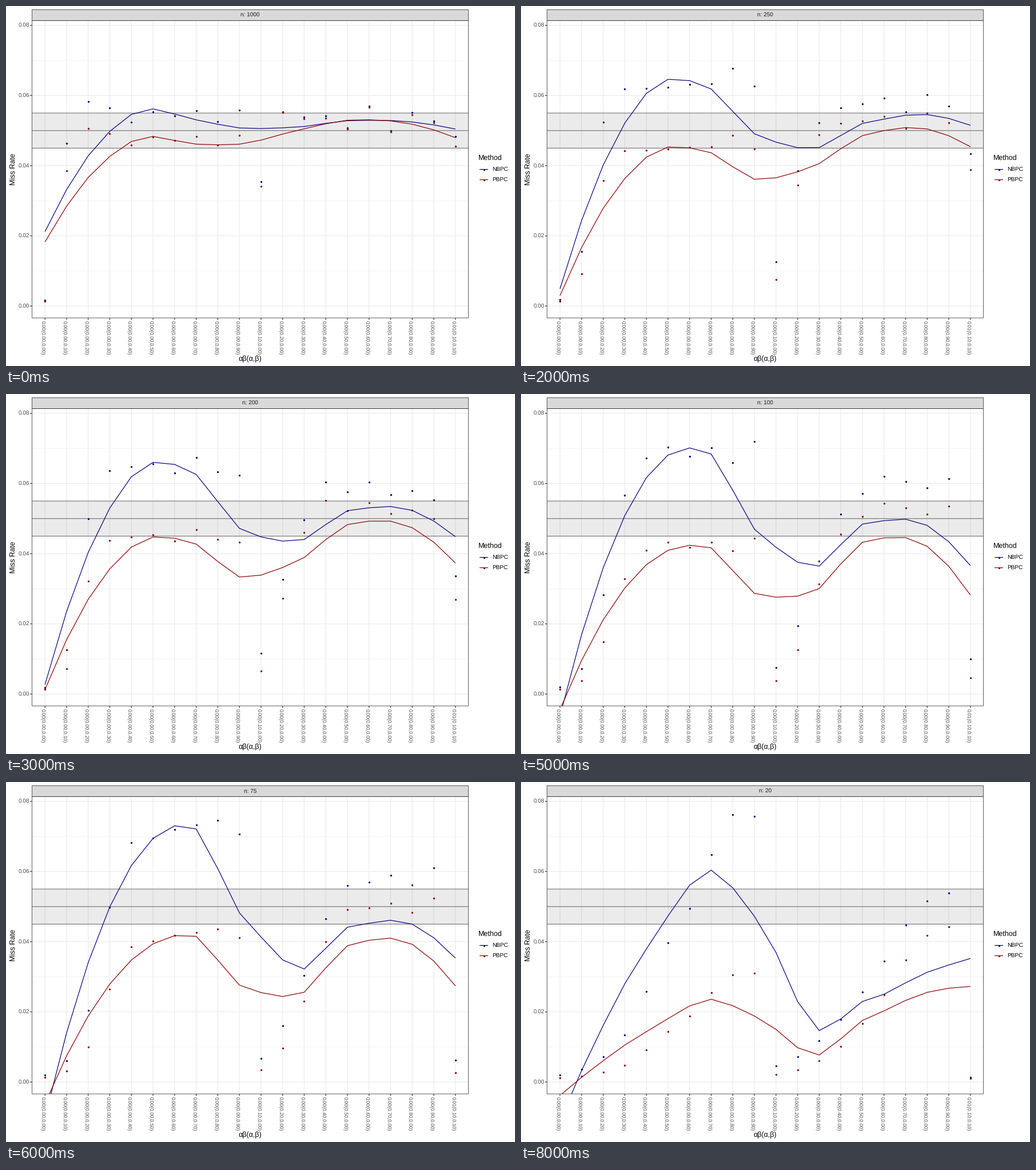
A matplotlib script that plays this animation: 890x629 px, repeating every 9 s.

```python
import numpy as np
import matplotlib.pyplot as plt
from matplotlib.animation import FuncAnimation
from matplotlib.patches import Rectangle

W, H, DPI = 890, 629, 64
PX = 72 / DPI  # points per pixel
LEFT, RIGHT, TOP, BOTTOM = 45.5, 808.5, 25.5, 545
COLORS = ("#000080", "#8b0000")
DARK, GREY, GRID = "#333333", "#4d4d4d", "#ebebeb"
SIZES = (1000, 500, 250, 200, 150, 100, 75, 50, 20)

plt.rcParams.update({"font.family": "Liberation Sans", "path.snap": False,
                     "text.hinting": "none"})

# Effects: beta rises with alpha at 0, then alpha with beta at 0, then both 0.1
LEVELS = np.arange(1, 21)
BETA = np.where(LEVELS <= 10, (LEVELS - 1) / 10, 0)
ALPHA = np.where(LEVELS > 10, (LEVELS - 10) / 10, 0)
ALPHA[-1] = BETA[-1] = 0.1

STEP = (RIGHT - LEFT) / 20.2
XS = LEFT + (LEVELS - 0.4) * STEP


def to_y(rate):
    return 524.2 - np.asarray(rate) * 6130


def rise(z, top, mid, width):
    return top / (1 + np.exp((mid - z) / width))


def miss_rates(n, rng):
    """Miss rates of both methods: each climbs to its plateau with effect * sqrt(n)."""
    za, zb = ALPHA * np.sqrt(n), BETA * np.sqrt(n)
    size = np.log(n / 20)
    beta_part = (rise(zb, 0.078 - 0.006 * size, 2.25, 0.55),
                 rise(zb, 0.050 - 0.082 / np.sqrt(n), 2.4, 0.55))
    alpha_part = (rise(za, 0.065 - 0.0032 * size, 2.65, 0.8),
                  rise(za, 0.052, 2.8, 0.65))
    both = (rise(za, 0.049, 1.25, 0.18), rise(za, 0.046, 1.35, 0.15))
    mean = np.where(LEVELS <= 10, beta_part, alpha_part)
    mean = np.where(LEVELS == 20, both, mean)
    noisy = mean * (1 + rng.normal(0, 0.032, 20)) + 0.0008
    return np.round(noisy * 5000) / 5000


# Loess, span 0.75, degree 2: exact at the k-d knots, cubic in between
KNOTS = np.array([0.905, 3, 5, 8, 10, 13, 15, 18, 20.095])


def local_fit(x0, y):
    d = np.abs(LEVELS - x0)
    w = np.clip(1 - (d / np.sort(d)[14]) ** 3, 0, None) ** 3
    _, slope, value = np.polyfit(LEVELS - x0, y, 2, w=np.sqrt(w))
    return value, slope


def loess(y):
    v, s = np.array([local_fit(k, y) for k in KNOTS]).T
    i = np.searchsorted(KNOTS, LEVELS) - 1
    h = KNOTS[i + 1] - KNOTS[i]
    t = (LEVELS - KNOTS[i]) / h
    return ((1 + 2 * t) * (1 - t) ** 2 * v[i] + t * (1 - t) ** 2 * h * s[i]
            + t * t * (3 - 2 * t) * v[i + 1] + t * t * (t - 1) * h * s[i + 1])


rng = np.random.default_rng(4)
rates = [miss_rates(n, rng) for n in SIZES]

fig = plt.figure(figsize=(W / DPI, H / DPI), dpi=DPI, facecolor="white")
ax = fig.add_axes([0, 0, 1, 1])
ax.set(xlim=(0, W), ylim=(H, 0))
ax.axis("off")


def line(x, y, color, width, z):
    return ax.plot(x, y, color=color, lw=width * PX, zorder=z,
                   solid_capstyle="butt", solid_joinstyle="round")[0]


def dots(x, y, color, z):
    return ax.plot(x, y, "o", color=color, ms=3.3 * PX, mew=0, zorder=z)[0]


def box(top, bottom, z, **style):
    return ax.add_patch(Rectangle((LEFT, top), RIGHT - LEFT, bottom - top,
                                  zorder=z, **style))


def text(x, y, s, size, color="black", **kw):
    return ax.text(x, y, s, fontsize=size * PX, color=color, va="baseline",
                   rotation_mode="anchor", zorder=9, **kw)


# Grid, axes and reference band
for r in (0.01, 0.03, 0.05, 0.07):
    line([LEFT, RIGHT], [to_y(r)] * 2, GRID, 0.6, 1)
for r in (0, 0.02, 0.04, 0.06, 0.08):
    y = to_y(r)
    line([LEFT, RIGHT], [y, y], GRID, 1.2, 1)
    line([LEFT - 3.4, LEFT], [y, y], DARK, 1.2, 1)
    text(41, y + 3.6, f"{r:.2f}", 10, GREY, ha="right")
for x, a, b in zip(XS, ALPHA, BETA):
    line([x, x], [TOP, BOTTOM], GRID, 1.2, 1)
    line([x, x], [BOTTOM, BOTTOM + 3.4], DARK, 1.2, 1)
    text(x - 6.3, 549.5, f"{a * b:.2f}({a:.2f},{b:.2f})", 8.75, GREY,
         ha="left", rotation=270)

box(to_y(0.055), to_y(0.045), 2, fc="black", alpha=0.08, lw=0)
for r in (0.045, 0.05, 0.055):
    line([LEFT, RIGHT], [to_y(r)] * 2, "#707070", 1.1, 3)

panel = box(TOP, BOTTOM, 7, fc="none", ec=DARK, lw=0.8 * PX)
box(6.5, TOP, 6, fc="#d9d9d9", ec=DARK, lw=0.8 * PX)

text(427, 620.5, "αβ(α,β)", 12.5, ha="center")
text(15.5, 285, "Miss Rate", 12.5, ha="center", rotation=90)
strip = text(427, 19.2, "", 10, "#1a1a1a", ha="center")

# Legend
text(826, 268.8, "Method", 12.5, ha="left")
for name, color, y in zip(("NBPC", "PBPC"), COLORS, (285.5, 303.5)):
    line([828, 843], [y, y], color, 1.2, 5)
    dots([835.5], [y], color, 5)
    text(850.3, y + 3.6, name, 10, ha="left")

points = [dots(XS, XS, c, 4) for c in COLORS]
curves = [line(XS, XS, c, 1.2, 5) for c in COLORS]
for artist in points + curves:
    artist.set_clip_path(panel)


def update(k):
    strip.set_text(f"n: {SIZES[k]}")
    for y, p, c in zip(rates[k], points, curves):
        p.set_ydata(to_y(y))
        c.set_ydata(to_y(loess(y)))
    return [strip, *points, *curves]


anim = FuncAnimation(fig, update, frames=len(SIZES), interval=1000,
                     repeat=True, repeat_delay=0)
plt.show()
```
